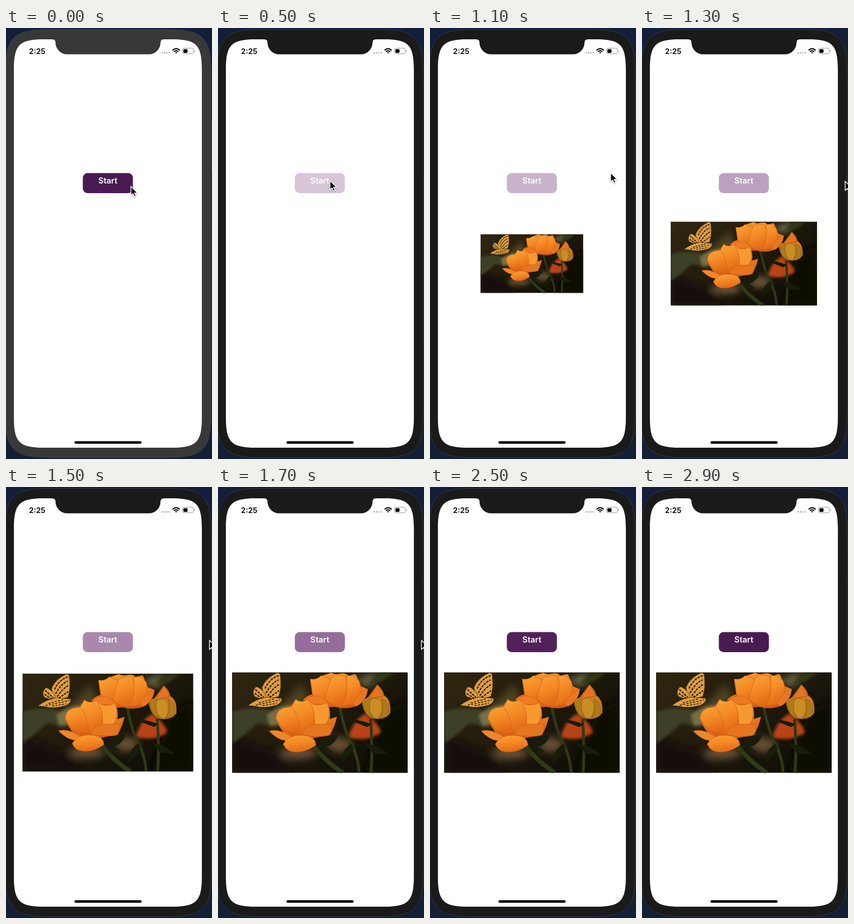
Write an HTML page that moves like this. It is 366 px wide and 762 px high and loops after 3000 ms.

```html
<!DOCTYPE html>
<html lang="en">
<head>
<meta charset="utf-8">
<title>Start button and zooming picture</title>
<style>
  html, body { margin: 0; width: 100%; height: 100%; overflow: hidden; background: #111c36; }
  svg { display: block; }
  text { font-family: Inter, sans-serif; font-weight: 600; }
</style>
</head>
<body>
<svg width="366" height="762" viewBox="0 0 366 762">
  <defs>
    <linearGradient id="desk" x2="0" y2="1">
      <stop stop-color="#121e3a"/><stop offset=".5" stop-color="#1b2040"/><stop offset="1" stop-color="#131f34"/>
    </linearGradient>
    <linearGradient id="night" x2="1" y2=".7">
      <stop stop-color="#30270f"/><stop offset=".4" stop-color="#251e0e"/><stop offset="1" stop-color="#0e0d06"/>
    </linearGradient>
    <linearGradient id="petal" x2=".3" y2="1">
      <stop stop-color="#f8a535"/><stop offset=".5" stop-color="#f58b26"/><stop offset="1" stop-color="#e56b17"/>
    </linearGradient>
    <linearGradient id="deep" x2="0" y2="1">
      <stop stop-color="#f69528"/><stop offset="1" stop-color="#d45714"/>
    </linearGradient>
    <linearGradient id="yolk" x2="0" y2="1">
      <stop stop-color="#e67a22"/><stop offset="1" stop-color="#b07f1c"/>
    </linearGradient>
    <filter id="soft" x="-50%" y="-50%" width="200%" height="200%"><feGaussianBlur stdDeviation="7"/></filter>
    <filter id="haze" x="-50%" y="-50%" width="200%" height="200%"><feGaussianBlur stdDeviation="2.5"/></filter>
    <filter id="shade" x="-50%" y="-50%" width="200%" height="200%">
      <feDropShadow dx="0" dy="1" stdDeviation="1" flood-opacity=".4"/>
    </filter>
    <clipPath id="frame"><rect width="312" height="178"/></clipPath>
  </defs>

  <rect width="366" height="762" fill="url(#desk)"/>
  <g id="bezel">
    <rect x="362" y="163" width="4" height="91"/>
    <path id="shell" stroke="#3a3d4a" stroke-width=".8"/>
  </g>
  <path id="screen" fill="#fff"/>
  <path id="notch" d="M80 19V20H82Q88 20 88 26A20.500 20.500 0 0 0 108.500 46.500H254A20.500 20.500 0 0 0 274.500 26Q274.500 20 280.500 20V19Z"/>

  <text x="40.800" y="45.500" font-size="13.400">2:25</text>
  <g fill="#b4b4b4">
    <circle cx="277.500" cy="44" r="1.400"/><circle cx="281.800" cy="44" r="1.400"/>
    <circle cx="286" cy="44" r="1.400"/><circle cx="290.300" cy="44" r="1.400"/>
  </g>
  <g fill="none" stroke="#000" stroke-width="2">
    <path d="M296 39.500Q302.300 33.500 308.600 39.500M298.400 42Q302.300 38.500 306.200 42"/>
    <path d="M300.400 43.300Q302.300 41.800 304.200 43.300L302.300 45.200Z" fill="#000" stroke="none"/>
  </g>
  <rect x="313.500" y="35.800" width="19.500" height="9.800" rx="2.800" fill="none" stroke="#999"/>
  <path d="M334.300 39v3.500q1.400-.5 1.400-1.750t-1.400-1.750" fill="#999"/>
  <rect x="315.200" y="37.400" width="7.300" height="6.600" rx="1.400"/>
  <rect x="121.500" y="730.500" width="119.500" height="4.500" rx="2.250"/>

  <g id="button">
    <rect id="plate" x="136.500" y="256.500" width="89" height="35.500" rx="8.500"/>
    <text x="181" y="275" font-size="14.400" text-anchor="middle" fill="#fff">Start</text>
  </g>

  <g id="photo"><g clip-path="url(#frame)">
    <rect width="312" height="178" fill="url(#night)"/>
    <g filter="url(#soft)">
      <path d="M70 75L125 20L140 60L70 100Z" fill="#4d4322"/>
      <ellipse cx="118" cy="143" rx="32" ry="10" fill="#6d553b"/>
      <ellipse cx="190" cy="128" rx="22" ry="13" fill="#665033"/>
      <path d="M0 110L90 150L110 178H0Z" fill="#120f07"/>
      <path d="M270 70L312 50V178H235Z" fill="#0f0e06"/>
      <path d="M215 15L260 0L248 25Z" fill="#76734f"/>
    </g>
    <g filter="url(#haze)">
      <path d="M0 70Q40 55 86 74L72 95L45 90L20 112L0 126Z" fill="#3d3f27"/>
      <path d="M62 76Q85 56 112 58L86 92L68 95Z" fill="#767048"/>
      <path d="M207 115Q214 86 237 73Q264 94 264 107Q240 124 207 115Z" fill="#b94212"/>
      <path d="M240 20L262 2L290 0L266 16Z" fill="#333919"/>
    </g>

    <g fill="none" stroke="#2f3916" stroke-width="5">
      <path d="M191 60Q200 105 212 127T226 178M246 83Q250 130 247 178"/>
      <path d="M142 128Q165 157 197 178" stroke-width="8"/>
    </g>
    <path d="M153 125Q168 110 188 110Q184 128 166 132L182 142L155 136ZM212 126Q192 140 193 162Q207 150 216 134ZM207 84Q224 82 248 92L240 97ZM236 126Q263 130 278 146L250 143Z" fill="#181d0a"/>

    <g stroke="#c95e17" stroke-width=".7">
      <path d="M127 49Q131 42 143 39L139 13Q151 15 158 7L176 1Q184 5 190 3Q202 0 207 7Q216 3 220 4L229 25L241 30Q237 48 225 58Q204 67 183 61Q163 63 150 56Q144 60 127 49Z" fill="url(#deep)"/>
      <path d="M139 12Q151 14 158 6L177 14Q169 43 174 59Q155 48 143 39Z" fill="url(#petal)"/>
      <path d="M176 10Q191 3 201 7Q212 36 196 60Q178 63 165 46Q170 25 176 10Z" fill="url(#petal)"/>
      <path d="M203 7Q216 2 226 16Q233 42 213 57L195 60Q208 37 203 7Z" fill="url(#petal)"/>
      <path d="M127 48Q146 36 163 47L174 60Q163 62 153 56Q144 60 127 48Z" fill="#f07a20"/>
      <path d="M215 56Q221 35 241 30Q239 51 220 60Z" fill="#e87722"/>

      <path d="M78 82Q80 68 92 63L105 60L113 48Q122 56 134 48L143 56Q160 59 169 53Q176 70 173 83L186 79Q183 94 174 111L150 115L114 123Q90 114 78 82Z" fill="url(#deep)"/>
      <path d="M78 82Q78 68 92 63L107 61Q121 72 124 107Q103 110 90 100Z" fill="url(#petal)"/>
      <path d="M106 61L113 48Q123 56 135 48Q150 65 145 101L122 108Q118 75 106 61Z" fill="url(#petal)"/>
      <path d="M136 49L145 57Q159 60 169 53Q178 79 164 94L145 101Q151 72 136 49Z" fill="#f69a30"/>
      <path d="M66 104Q83 99 104 113L110 119Q88 127 66 104Z" fill="#f0862a"/>
      <path d="M91 127Q101 109 130 112Q148 114 149 129Q126 145 105 140Q95 137 91 127Z" fill="url(#petal)"/>
      <path d="M125 110Q128 97 145 92H178Q179 105 170 112Q148 115 125 110Z" fill="#e5761f"/>
    </g>

    <g stroke="#85560f" stroke-width=".7">
      <path d="M231 55Q232 47 241 45L258 22Q268 30 270 41Q283 48 281 72Q272 85 252 82Q236 80 231 55Z" fill="url(#yolk)"/>
      <path d="M240 52L258 22Q266 29 268 43Q249 43 240 52Z" fill="#ec7022"/>
      <path d="M244 49Q261 40 266 57Q268 75 258 82Q241 78 244 49Z" fill="#c98f26"/>
      <path d="M233 56Q239 45 246 48Q241 64 249 79Q236 76 233 56ZM266 47Q283 55 276 78L262 81Q272 65 266 47Z" fill="#b07a1b"/>
    </g>

    <g fill="#dd9c40" stroke="#3a2711" stroke-width=".8">
      <path d="M53 27Q60 10 80 1Q86 0 86 9Q88 29 83 43L58 49Z"/>
      <path d="M42 26Q47 24 59 38L60 50L40 43Q34 35 42 26Z"/>
      <path d="M28 59Q43 47 62 44L88 46Q90 52 80 58Q55 65 41 60Z"/>
    </g>
    <g fill="none" stroke="#28190b" stroke-width="2.200" stroke-dasharray="2.500 3.500" stroke-linecap="round">
      <path d="M59 28Q67 11 83 6M61 36Q70 19 82 14M64 41Q73 28 83 22M67 44L83 33M42 31L56 44M41 38L53 46"/>
      <path d="M43 58L85 49M48 54L75 47M55 59L79 55" stroke-width="1.500"/>
    </g>
  </g></g>

  <path id="cursor" d="M0 0V16L3.700 12.700L6.300 18.200L8.900 17L6.400 11.600H11.500Z" stroke="#fff" stroke-width="1.300" filter="url(#shade)"/>
</svg>
<script>
const LOOP = 3000, STEP = 100;
const [bezel, shell, screen_, notch, button, plate, photo, cursor] =
  ["bezel", "shell", "screen", "notch", "button", "plate", "photo", "cursor"].map(id => document.getElementById(id));

// time, x, y of the pointer tip
const pointer = [[0, 222, 280], [400, 199, 270], [600, 199, 270], [1100, 321, 256], [1300, 361, 271], [1500, 361.5, 271]];

// rounded box whose corners ease into the straight sides
function smoothBox(x, y, w, h, radius) {
  const e = radius * 1.53, k = e * 0.18, m = e - k;
  return `M${x} ${y + e}c0 ${-m} ${k} ${-e} ${e} ${-e}`.replace(/c.*/, `C${x} ${y + k} ${x + k} ${y} ${x + e} ${y}`) +
    `h${w - 2 * e}c${m} 0 ${e} ${k} ${e} ${e}` +
    `v${h - 2 * e}c0 ${m} ${-k} ${e} ${-e} ${e}` +
    `h${2 * e - w}c${-m} 0 ${-e} ${-k} ${-e} ${-e}Z`;
}
shell.setAttribute("d", smoothBox(-1.5, 2.5, 366, 757, 51));
screen_.setAttribute("d", smoothBox(14, 20, 334, 722, 35));

const progress = (t, start, length) => Math.min(1, Math.max(0, (t - start) / length));

// cubic-bezier(.42, 0, .58, 1)
function easeInOut(p) {
  let low = 0, high = 1, u = 0.5;
  for (let i = 0; i < 20; i++) {
    const x = 1.26 * u * (1 - u) ** 2 + 1.74 * u * u * (1 - u) + u ** 3;
    if (x < p) low = u; else high = u;
    u = (low + high) / 2;
  }
  return u * u * (3 - 2 * u);
}

function pointerAt(t) {
  const next = pointer.findIndex(key => key[0] > t);
  if (next < 0) return pointer.at(-1).slice(1);
  const [t0, x0, y0] = pointer[next - 1], [t1, x1, y1] = pointer[next];
  const p = (t - t0) / (t1 - t0);
  return [x0 + (x1 - x0) * p, y0 + (y1 - y0) * p];
}

function draw(t) {
  const tone = t < 400 ? "#383838" : "#1a1a1a";
  bezel.setAttribute("fill", tone);
  notch.setAttribute("fill", tone);

  // the purple is purer while the button is translucent
  const opacity = t < 400 ? 1 : 0.22 + 0.78 * easeInOut(progress(t, 600, 2300));
  button.setAttribute("opacity", opacity);
  plate.setAttribute("fill", `rgb(74, ${Math.round(27 * opacity ** 3)}, 83)`);

  const scale = t < 600 ? 0 : easeInOut(progress(t, 440, 1200));
  photo.setAttribute("transform", `translate(181 416.5) scale(${scale}) translate(-156 -89)`);

  cursor.setAttribute("transform", `translate(${pointerAt(t)})`);
  cursor.setAttribute("visibility", t < 2300 ? "visible" : "hidden");
}

function tick() {
  draw(Math.floor(performance.now() % LOOP / STEP) * STEP);
  requestAnimationFrame(tick);
}
tick();
</script>
</body>
</html>
```
